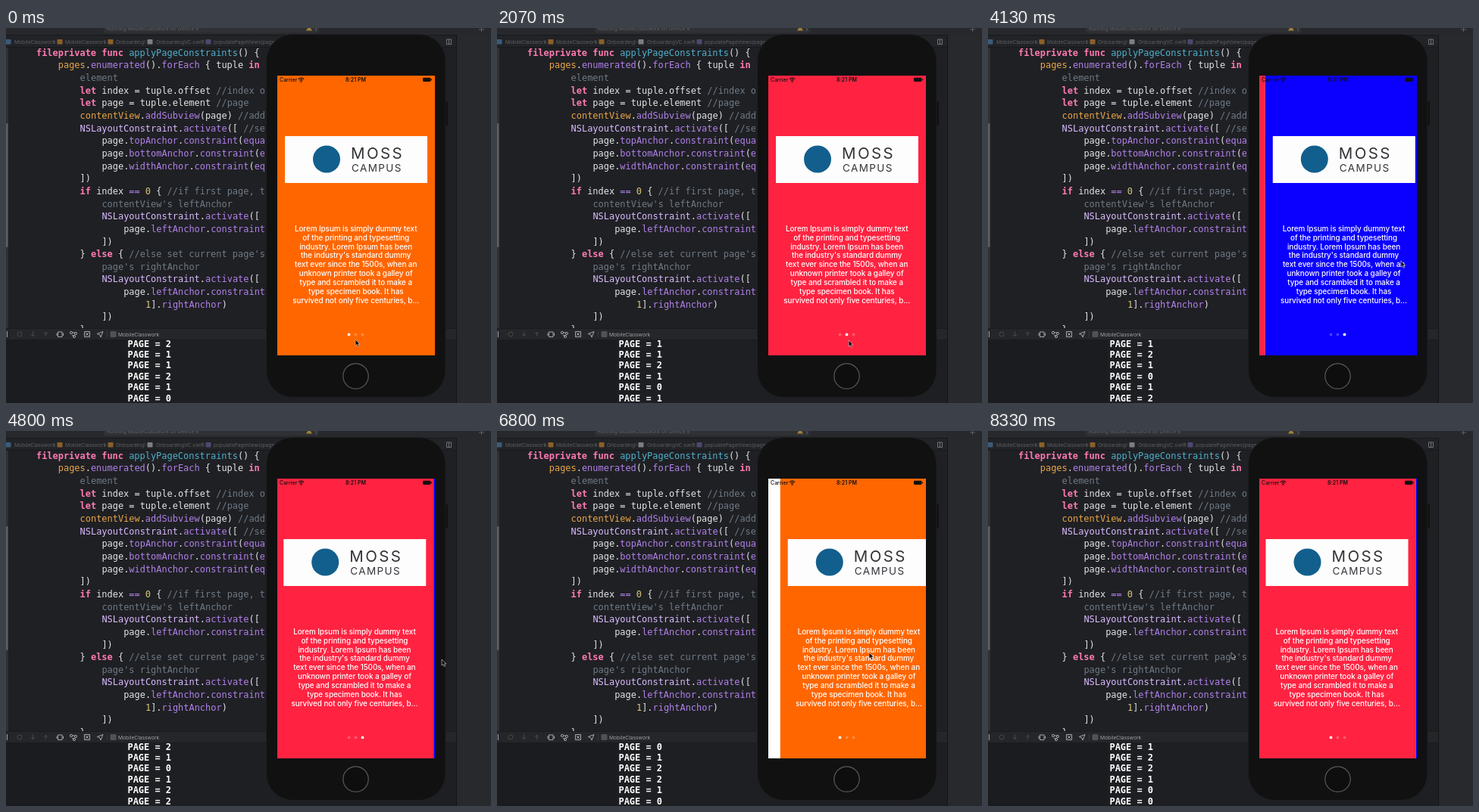
Recreate the animation shown at these times as an HTML page. Size 640 by 496 pixels, loop 8.39 s.

```html
<!DOCTYPE html>
<html lang="en">
<head>
<meta charset="utf-8">
<title>Onboarding pages</title>
<style>
  html, body { margin: 0; width: 100%; height: 100%; overflow: hidden; background: #1f2024; }
  svg { display: block; width: 100vw; height: 100vh; }
  text { white-space: pre; font-family: Inter, "Open Sans", sans-serif; }
  .mono { font: 11.95px "DejaVu Sans Mono", "Noto Sans Mono", monospace; fill: #e4e4e6; }
  .log { font-weight: 700; fill: #fff; }
  .bar { font-size: 6.7px; fill: #85878b; }
  .status { font-size: 7px; font-weight: 500; fill: #101010; }
  .body { font-size: 9.9px; font-weight: 500; letter-spacing: -.06px; fill: #fff; text-anchor: middle; }
  .name { fill: #333438; }
</style>
</head>
<body>
<svg id="stage" viewBox="0 0 640 496">
  <defs>
    <clipPath id="codeClip"><rect x="0" y="25" width="341" height="372"/></clipPath>
    <clipPath id="logClip"><rect x="158" y="413" width="200" height="83"/></clipPath>
    <clipPath id="screenClip"><rect x="358" y="63" width="208" height="370"/></clipPath>
  </defs>

  <!-- editor window -->
  <rect width="640" height="496" fill="#1f2024"/>
  <rect width="640" height="9" fill="#27282b"/>
  <rect x="129" y="-5" width="284" height="11.5" rx="3" fill="#303134"/>
  <g opacity=".6">
    <text class="bar" x="133" y="2.6">Running MobileClasswork on Device 8</text>
    <path d="M400 -3l4 6.5h-8z" fill="#e9b53c"/>
    <path d="M408 0l2 2-2 2M624 2h7M627.5 -1v6" fill="none" stroke="#808185"/>
  </g>
  <rect y="9" width="640" height="16" fill="#222326"/>
  <path d="M0 9.5h640M0 25.5h594" stroke="#18191b"/>
  <g id="crumbs" opacity=".6"></g>
  <path d="M581.5 15h6v6.5h-6zM584.5 15v6.5" fill="none" stroke="#727478"/>
  <rect y="26" width="3" height="371" fill="#303135"/>
  <rect y="126" width="2.6" height="164" rx="1.3" fill="#5c5e62"/>
  <g id="code" clip-path="url(#codeClip)"></g>

  <!-- debug area -->
  <rect y="397" width="594" height="16" fill="#252629"/>
  <path d="M0 397.5h594M0 412.5h594" stroke="#1a1b1d"/>
  <rect y="413" width="158" height="83" fill="#1b1c1f"/>
  <rect x="158" y="413" width="436" height="83" fill="#1e1f22"/>
  <rect x="594" y="9" width="46" height="487" fill="#28292c"/>
  <path d="M594.5 9v487" stroke="#141517"/>
  <g fill="none" stroke="#45474b">
    <circle cx="18" cy="405" r="3"/>
    <path d="M35.5 401v6M33 405l2.5 3 2.5-3M52.5 408v-6M50 405l2.5-3 2.5 3"/>
  </g>
  <g fill="none" stroke="#a4a6aa">
    <path d="M1.5 401v8M68.5 402h5.5v6.5h-5.5zM67 403.5v3.5M75.5 403.5v3.5"/>
    <path d="M87.5 403h4M87 406l3 2"/>
    <circle cx="86" cy="403" r="1.6"/><circle cx="92" cy="404" r="1.6"/><circle cx="90" cy="408" r="1.6"/>
    <path d="M103.5 401.5h7v7h-7zM105 403l4 4M109 403l-4 4"/>
    <path d="M128 401.5l-3 7.5-1.3-3.3-3.4-1.2z"/>
  </g>
  <path d="M133.5 401v8" stroke="#38393d"/>
  <rect x="137.5" y="401" width="8" height="8" rx="1.5" fill="#505256"/>
  <text class="bar" x="148" y="407.5" style="fill:#a0a2a6">MobileClasswork</text>
  <g id="log" clip-path="url(#logClip)"></g>

  <!-- phone -->
  <rect x="578" y="97" width="5" height="32" rx="1.5" fill="#111113"/>
  <rect x="343.5" y="8.5" width="236.5" height="480" rx="35" fill="#111112" stroke="#1d1e20"/>
  <circle cx="461.5" cy="460.5" r="16.7" fill="#0e0e0f" stroke="#58595b" stroke-width="1.2"/>
  <g clip-path="url(#screenClip)">
    <rect x="358" y="63" width="208" height="370" fill="#fff"/>
    <g id="pages"></g>
    <text class="status" x="361" y="71">Carrier</text>
    <path d="M385.8 67.7a5 5 0 0 1 7.4 0M387.5 69.4a2.9 2.9 0 0 1 4 0" fill="none" stroke="#101010" stroke-width="1.2"/>
    <circle cx="389.5" cy="71" r=".9" fill="#101010"/>
    <text class="status" x="461.5" y="71" text-anchor="middle" style="font-weight:600">8:21 PM</text>
    <rect x="550" y="65.7" width="10.5" height="5.2" rx="1.4" fill="#101010"/>
    <rect x="561" y="67.3" width="1" height="2" fill="#101010"/>
    <g id="dots"></g>
  </g>
  <path id="cursor" d="M0 0v8.2l1.9-1.7 1.3 3 1.5-.7-1.3-2.9h2.5z" fill="#080808" stroke="#ddd" stroke-width=".6"/>
</svg>

<script>
const LOOP = 8390, FPS = 15, LEFT = 358, WIDTH = 208;
const $ = id => document.getElementById(id);

function add(parent, tag, attrs, text) {
  const el = document.createElementNS("http://www.w3.org/2000/svg", tag);
  for (const key in attrs) el.setAttribute(key, attrs[key]);
  if (text !== undefined) el.textContent = text;
  parent.append(el);
  return el;
}

// Breadcrumb bar
const crumbs = [
  [3, 11, "MobileClasswork", "#4b83b5"],
  [71, 78, "MobileClasswork", "#d08a2c"],
  [138, 145, "Onboarding", "#d08a2c"],
  [190, 198, "OnboardingVC.swift", "#b9bbbe"],
  [267, 274, "populatePageViews(page:", "#6d5fa3"]
];
crumbs.forEach(([icon, x, label, fill], i) => {
  add($("crumbs"), "rect", { x: icon - 3.5, y: 15, width: 7, height: 6.5, rx: 1, fill });
  add($("crumbs"), "text", { x, y: 20.7, class: "bar" }, label);
  if (i) add($("crumbs"), "path", { d: `M${icon - 8} 16l2 2.3-2 2.3`, fill: "none", stroke: "#707276", "stroke-width": .8 });
});

// Source code: indent in columns, then the line; "~" marks a wrapped comment
const code = [
  [0, "fileprivate func applyPageConstraints() {"],
  [4, "pages.enumerated().forEach { tuple in"],
  [8, "~element"],
  [8, "let index = tuple.offset //index of"],
  [8, "let page = tuple.element //page"],
  [8, "contentView.addSubview(page) //add"],
  [8, "NSLayoutConstraint.activate([ //set"],
  [12, "page.topAnchor.constraint(equalTo"],
  [12, "page.bottomAnchor.constraint(equalTo"],
  [12, "page.widthAnchor.constraint(equalTo"],
  [8, "])"],
  [8, "if index == 0 { //if first page, to"],
  [12, "~contentView's leftAnchor"],
  [12, "NSLayoutConstraint.activate(["],
  [16, "page.leftAnchor.constraint(equalTo"],
  [12, "])"],
  [8, "} else { //else set current page's"],
  [12, "~page's rightAnchor"],
  [12, "NSLayoutConstraint.activate(["],
  [16, "page.leftAnchor.constraint(equalTo"],
  [20, "1].rightAnchor)"],
  [12, "])"],
  [8, "}"]
];
const syntax = [
  ["\\/\\/.*|~.*", "#6f7a85", 400],
  ["\\b(?:fileprivate|func|let|if|else|in)\\b", "#ff7ab2", 700],
  ["NSLayoutConstraint", "#dabaff", 400],
  ["applyPageConstraints", "#4eb0cc", 400],
  ["\\b(?:pages|contentView)\\b", "#e9a646", 400],
  ["\\b\\d\\b", "#d9c97c", 400],
  ["\\b(?:enumerated|forEach|addSubview|activate|\\w+Anchor|constraint|equalTo)\\b|==", "#b281eb", 400]
];
const token = new RegExp(syntax.map(s => `(${s[0]})`).join("|"), "g");

code.forEach(([indent, line], row) => {
  const el = add($("code"), "text", { x: 40 + indent * 7.2, y: 36.6 + row * 16.66, class: "mono" });
  let end = 0;
  for (const m of line.matchAll(token)) {
    const [, fill, weight] = syntax[m.slice(1).findIndex(Boolean)];
    add(el, "tspan", {}, line.slice(end, m.index));
    add(el, "tspan", { fill, style: `font-weight:${weight}` }, m[0].replace("~", ""));
    end = m.index + m[0].length;
  }
  add(el, "tspan", {}, line.slice(end));
});

// Three identical pages on their own colours
const blurb = [
  "Lorem Ipsum is simply dummy text", "of the printing and typesetting",
  "industry. Lorem Ipsum has been", "the industry's standard dummy",
  "text ever since the 1500s, when an", "unknown printer took a galley of",
  "type and scrambled it to make a", "type specimen book. It has",
  "survived not only five centuries, b..."
];
["#ff6600", "#ff2341", "#0b00ff"].forEach((fill, i) => {
  const page = add($("pages"), "g", { transform: `translate(${LEFT + i * WIDTH} 0)` });
  add(page, "rect", { y: 63, width: WIDTH, height: 370, fill });
  add(page, "rect", { x: 10, y: 143, width: 188, height: 62, fill: "#fdfdfd" });
  add(page, "circle", { cx: 65, cy: 173.5, r: 18, fill: "#125f8d" });
  add(page, "text", { x: 97, y: 173, class: "name", "font-size": 20.5, "letter-spacing": 2.4 }, "MOSS");
  add(page, "text", { x: 98, y: 190, class: "name", "font-size": 13.5, "letter-spacing": 1.4 }, "CAMPUS");
  blurb.forEach((line, n) => add(page, "text", { x: 103.7, y: 268.7 + n * 11.93, class: "body" }, line));
});

const dots = [452.5, 461.5, 470.5].map(cx => add($("dots"), "circle", { cx, cy: 405.4, r: 1.9, fill: "#fff" }));
const rows = [0, 1, 2, 3, 4, 5].map(i => add($("log"), "text", { x: 160.5, y: 421.6 + i * 14.4, class: "mono log" }));

// Pointer tip: time, x, y
const path = [
  [0, 461, 412], [1130, 464, 413], [2700, 464, 413], [3130, 464, 388],
  [3900, 537, 308], [4050, 537, 308], [4130, 544, 308], [4500, 632, 303], [4650, 632, 303],
  [5250, 404, 299], [5400, 404, 299], [5730, 568, 295], [6000, 600, 296], [6100, 600, 296],
  [6550, 460, 293], [6650, 460, 293], [6800, 491, 293], [7150, 598, 293], [7300, 598, 293],
  [7800, 530.5, 293], [7900, 530.5, 293], [8330, 321, 293]
];
// Taps: start, end, from page, to page
const taps = [[500, 800, 0, 1], [2100, 2400, 1, 2]];
// Drags: press, release, from page, press x, settled, to page
const drags = [
  [4050, 4500, 2, 537, 4900, 1],
  [5400, 6080, 1, 404, 6250, 0],
  [6650, 7250, 0, 460, 7600, 0],
  [7900, LOOP, 0, 530.5, LOOP + 300, 1]
];
// Printed page numbers: time, page
const prints = [[500, 1], [2100, 2], [4500, 2], [4900, 1], [6200, 0], [7600, 0]];

const lerp = (a, b, u) => a + (b - a) * u;
const part = (t, a, b) => Math.min(1, Math.max(0, (t - a) / (b - a)));
const easeInOut = u => u * u * (3 - 2 * u);
const easeOut = u => 1 - (1 - u) ** 3;

function pointer(t) {
  const i = path.findIndex(p => p[0] > t);
  if (i < 0) return path[path.length - 1].slice(1);
  const [a, b] = [path[i - 1], path[i]], u = part(t, a[0], b[0]);
  return [lerp(a[1], b[1], u), lerp(a[2], b[2], u)];
}

function rubber(pos) {
  return pos < 0 ? 1 / (1 - pos * .55) - 1 : pos;
}

function scroll(t) {
  let pos = 0;
  for (const [start, end, from, to] of taps)
    if (t >= start) pos = lerp(from, to, easeInOut(part(t, start, end)));
  for (const [press, release, from, x, settled, to] of drags)
    if (t >= press) {
      const held = rubber(from - (pointer(Math.min(t, release))[0] - x) / WIDTH);
      pos = lerp(held, to, easeOut(part(t, release, settled)));
    }
  return pos;
}

function draw(t) {
  const log = [2, 1, 1, 2, 1, 0, ...prints.filter(p => t >= p[0]).map(p => p[1])].slice(-6);
  rows.forEach((row, i) => row.textContent = "PAGE = " + log[i]);
  dots.forEach((dot, i) => dot.setAttribute("opacity", i === log[5] ? 1 : .25));
  $("pages").setAttribute("transform", `translate(${-scroll(t) * WIDTH} 0)`);
  $("cursor").setAttribute("transform", `translate(${pointer(t)})`);
}

const begin = performance.now();
function tick() {
  const t = (performance.now() - begin) % LOOP;
  draw(Math.floor((t + 7) * FPS / 1000) * 1000 / FPS);
  requestAnimationFrame(tick);
}
tick();
</script>
</body>
</html>
```
